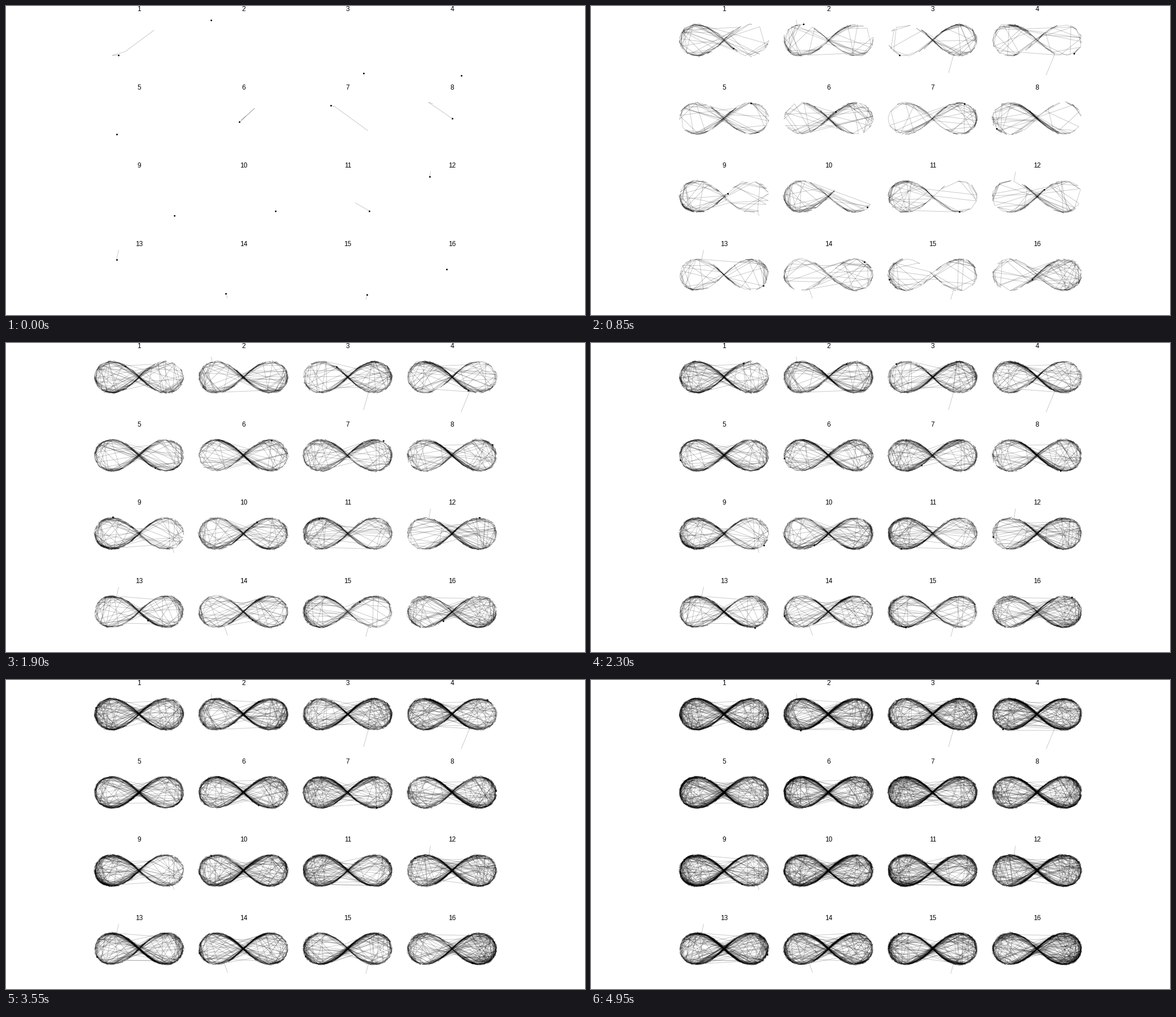
Write a matplotlib script that moves like this. It is 1025 px wide and 547 px high and loops after 5000 ms.

```python
import numpy as np
import matplotlib.pyplot as plt
from matplotlib.animation import FuncAnimation
from matplotlib.collections import LineCollection

WIDTH, HEIGHT, DPI = 1025, 547, 64
PT = 72 / DPI               # points per pixel
FRAMES, INTERVAL = 100, 50
MOVES = 9                   # accepted moves per frame
RADIUS = 78.5               # half width of the lemniscate

# Where each chain begins, relative to its panel centre.
STARTS = np.array([
    (27, -18), (-57, -36), (28, 58), (16, 62),
    (-40, 28), (4, -4), (36, 22), (-34, -26),
    (62, 34), (57, 26), (13, 11), (-38, -44),
    (-36, -44), (-28, 42), (32, 44), (-10, -10),
], float)

angle = np.linspace(0, 2 * np.pi, 2001)
scale = RADIUS / (1 + np.sin(angle) ** 2)
curve = np.column_stack([scale * np.cos(angle),
                         scale * np.sin(angle) * np.cos(angle)])
arc = np.concatenate([[0], np.cumsum(np.hypot(*np.diff(curve, axis=0).T))])
LENGTH = arc[-1]


def on_curve(s):
    s = s % LENGTH
    return np.array([np.interp(s, arc, curve[:, 0]),
                     np.interp(s, arc, curve[:, 1])])


def panel_centre(index):
    row, col = divmod(index, 4)
    return np.array([235.5 + 184.7 * col, 60.5 + 138.4 * row])


def make_chain(index):
    """Slide onto the curve, then walk it in short shuffles and long leaps."""
    rng = np.random.default_rng(40 + index)
    start = STARTS[index]
    distance = np.hypot(*(curve - start).T)
    nearest = np.argmin(distance)
    strides = int(distance[nearest] // 8)
    points = [start + (curve[nearest] - start) * j / strides
              for j in range(1, strides + 1)]
    points.insert(0, start)

    s = arc[nearest]
    while len(points) < MOVES * FRAMES + 4:
        before = on_curve(s)
        s += rng.normal(0, 18 if rng.random() < 0.58 else 62)
        # A leap through the crossing rarely lands on the other arm.
        if before[0] * on_curve(s)[0] < 0 and rng.random() < 0.02:
            s = -s
        points.append(on_curve(s) + rng.normal(0, 0.8, 2))
    return np.array(points) + panel_centre(index)


chains = [make_chain(i) for i in range(16)]
segments = [np.stack([c[:-1], c[1:]], axis=1) for c in chains]
opening_moves = np.random.default_rng(3).integers(0, 4, 16)

fig = plt.figure(figsize=(WIDTH / DPI, HEIGHT / DPI), dpi=DPI,
                 facecolor="white")
ax = fig.add_axes([0, 0, 1, 1])
ax.set_xlim(0, WIDTH)
ax.set_ylim(HEIGHT, 0)
ax.axis("off")

for i in range(16):
    x, y = panel_centre(i)
    ax.text(x, y - 51.2, str(i + 1), ha="center", va="baseline",
            family="Liberation Sans", size=11.7 * PT, color="black")

trails = LineCollection([], colors=[(0, 0, 0, 0.23)], linewidths=0.9 * PT,
                        zorder=2)
ax.add_collection(trails, autolim=False)
dots = ax.scatter(np.zeros(16), np.zeros(16), s=(2.9 * PT) ** 2,
                  color="black", linewidths=0, zorder=3)


def update(frame):
    last = opening_moves + MOVES * frame
    trails.set_segments(np.concatenate(
        [seg[:n] for seg, n in zip(segments, last)]))
    dots.set_offsets([chain[n] for chain, n in zip(chains, last)])
    return trails, dots


anim = FuncAnimation(fig, update, frames=FRAMES, interval=INTERVAL,
                     repeat=True, repeat_delay=0, blit=False)
plt.show()
```
